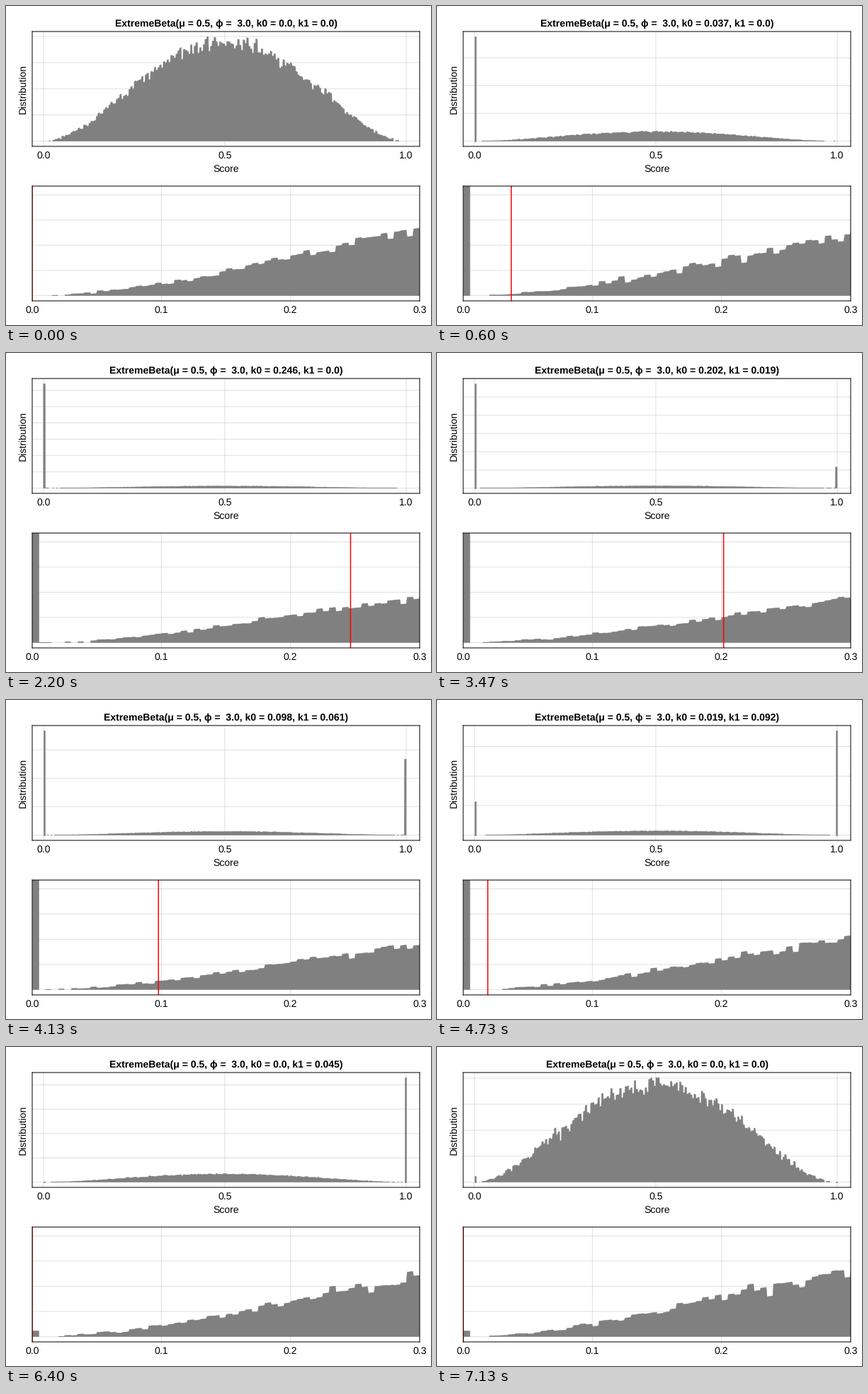
A matplotlib script that plays this animation: 600x450 px, repeating every 7.99 s.

```python
import math

import numpy as np
import matplotlib.pyplot as plt
from matplotlib.animation import FuncAnimation

W, H = 600, 450
FRAMES, LOOP_MS = 120, 7990
BINS = 200
WIDTH = 1 / BINS
GRAY = "#808080"

plt.rcParams["font.family"] = ["Liberation Sans", "DejaVu Sans"]
plt.rcParams["font.size"] = 14
plt.rcParams["text.hinting"] = "none"

# At 72 dpi one point is one pixel.
fig = plt.figure(figsize=(W / 72, H / 72), dpi=72, facecolor="white")


def label(x, y, text, **kw):
    kw = {"ha": "center", "va": "baseline", **kw}
    return fig.text(x / W, 1 - y / H, text, **kw)


def panel(top, bottom, xlim, xticks):
    left, right = 37, 584
    ax = fig.add_axes([left / W, 1 - bottom / H,
                       (right - left) / W, (bottom - top) / H])
    ax.set_xlim(xlim)
    ax.set_xticks(xticks)
    ax.set_axisbelow(True)
    ax.grid(color="black", alpha=0.12, linewidth=1, snap=False)
    ax.tick_params(length=0, labelbottom=False, labelleft=False)
    for spine in ax.spines.values():
        spine.set_linewidth(1)
        spine.set_snap(False)
    for tick in xticks:
        x = left + (tick - xlim[0]) / (xlim[1] - xlim[0]) * (right - left)
        label(x, bottom + 17, f"{tick:.1f}")
    return ax


full = panel(36, 198, (-0.0310, 1.0371), (0, 0.5, 1))
zoom = panel(254, 416, (0, 0.3), (0, 0.1, 0.2, 0.3))
zoom.set_ylim(-0.106, 2.176)
zoom.set_yticks(np.arange(0, 2.1, 0.5))
marker = zoom.axvline(0, color="red", linewidth=1.5, snap=False)

title = label(310.5, 29, "", weight="bold")
label(310.5, 234, "Score")
label(28, 117, "Distribution", rotation=90, rotation_mode="anchor")


def ease(t, start, end):
    u = min(max((t - start) / (end - start), 0), 1)
    return (1 - math.cos(math.pi * u)) / 2


def active(frame):
    """Last frame at which the picture was refreshed."""
    for first, last in ((35, 42), (77, 84), (107, FRAMES)):
        if first <= frame < last:
            return first
    return frame


def params(frame):
    t = frame / (FRAMES - 1)
    if t < 0.35:
        return 0.25 * ease(t, 0, 0.3), 0.0
    if t < 0.7:
        e = ease(t, 0.35, 0.65)
        return 0.25 * (1 - e), 0.1 * e
    # a trace of k0 is left over from the previous stage
    return 0.00006, 0.1 * (1 - ease(t, 0.7, 0.9))


def extreme_mass(k):
    odds = math.exp(0.367) * k ** 0.8
    return odds / (1 + odds)


def beta_pdf(x):
    return 30 * x ** 2 * (1 - x) ** 2


def histogram(frame, k0, k1):
    """Outline of the bars: two points per bin, left and right."""
    rng = np.random.default_rng(frame + 11)
    edges = np.arange(BINS) * WIDTH
    p0, p1 = extreme_mass(k0), extreme_mass(k1)
    mass = 1 - p0 - p1
    pdf = beta_pdf(edges + WIDTH / 2)
    noise = 0.04 * rng.normal(0, 1, BINS) * np.sqrt(1.875 * pdf)
    bars = np.clip(pdf + noise, 0, 2.01) * mass
    bars[rng.random(BINS) < np.exp(-60 * pdf)] = 0

    rise = (beta_pdf(edges + WIDTH) - beta_pdf(edges)) * mass / 4
    rise[bars == 0] = 0
    y = np.column_stack([bars - rise, bars + rise]).clip(0)
    y[0] += p0 / WIDTH
    y[-1] += p1 / WIDTH

    slant = 0.0003
    x = np.column_stack([edges + slant, edges + WIDTH - slant])
    x[0, 0], x[-1, 1] = 0, 1
    return x.ravel(), y.ravel()


def nice_ticks(top):
    """Round steps scored by count, coverage and simplicity."""
    span, best = 1.1 * top, None
    for power in (0.1, 1, 10):
        for base, nice in ((1, 1), (5, 0.9), (2, 0.7), (2.5, 0.5)):
            step = base * power
            n = int(1.05 * top / step) + 1
            if not 2 <= n <= 10:
                continue
            score = ((1 - abs(n - 5) / 5) / 4
                     + (n - 1) * step / span / 3 + nice / 4)
            if best is None or score > best[0]:
                best = score, n, step
    return np.arange(best[1]) * best[2]


fills = []


def draw(i):
    frame = active(i)
    k0, k1 = params(frame)
    x, y = histogram(frame, k0, k1)

    while fills:
        fills.pop().remove()
    for ax in (full, zoom):
        fills.append(ax.fill_between(x, 0, y, where=y > 0, facecolor=GRAY,
                                     edgecolor=GRAY, linewidth=0.5))

    top = y.max()
    full.set_ylim(-0.05 * top, 1.05 * top)
    full.set_yticks(nice_ticks(top))
    for line in full.get_ygridlines():
        line.set_snap(False)
    marker.set_xdata([k0, k0])
    title.set_text(f"ExtremeBeta(μ = 0.5, ϕ =  3.0, "
                   f"k0 = {round(k0, 3)}, k1 = {round(k1, 3)})")
    return [*fills, marker, title]


anim = FuncAnimation(fig, draw, frames=FRAMES, interval=LOOP_MS / FRAMES,
                     init_func=lambda: draw(0), repeat=True, repeat_delay=0,
                     blit=False)
plt.show()
```
